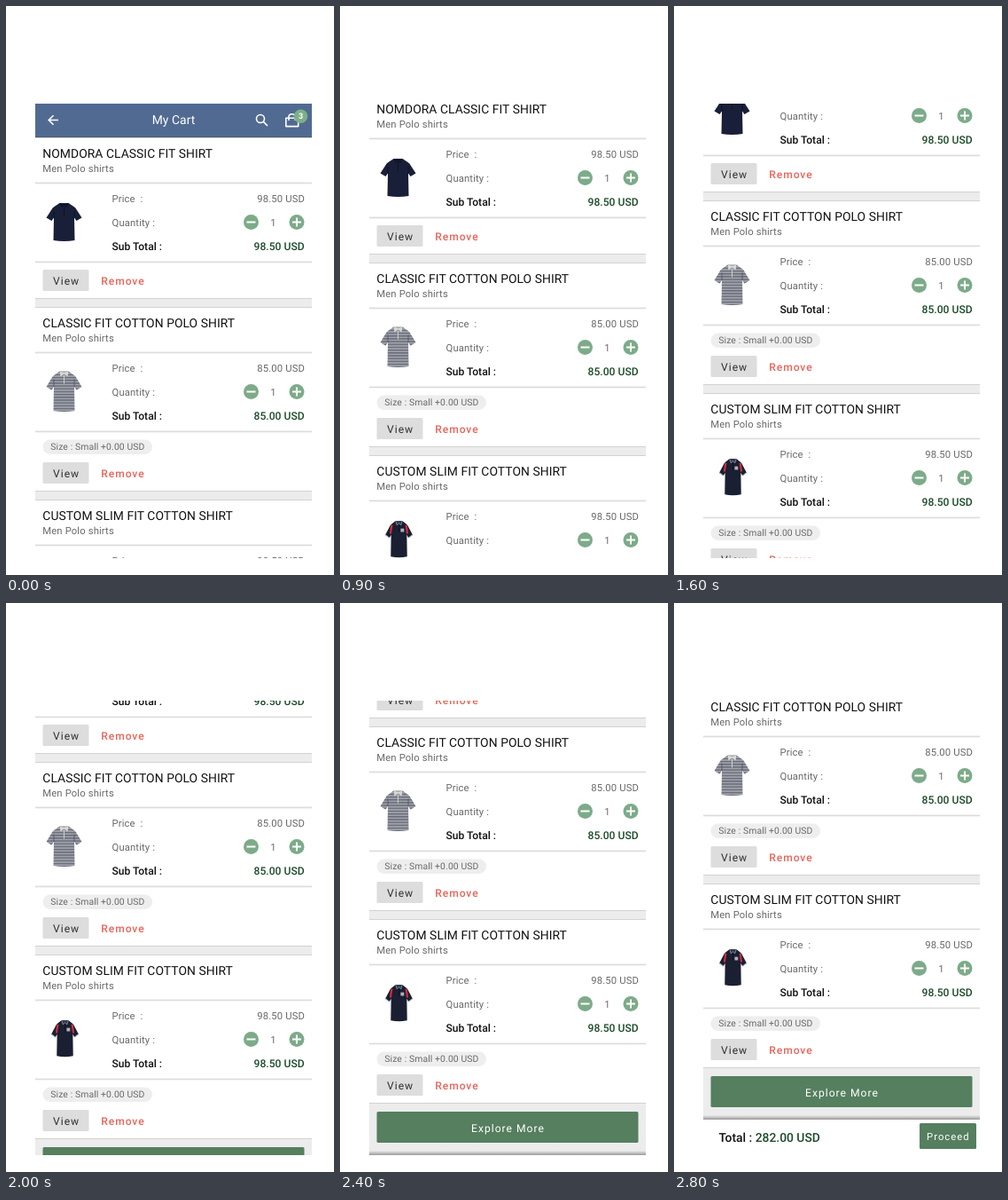
Recreate the animation shown at these times as an HTML page. Size 370 px wide and 641 px high, loop 3300 ms.

```html
<!DOCTYPE html>
<html lang="en">
<head>
<meta charset="utf-8">
<title>My Cart</title>
<style>
  html, body { margin: 0; width: 100%; height: 100%; overflow: hidden; background: #fff; }
  svg { display: block; }
  text { font: 400 11.27px Roboto, sans-serif; fill: #696969; white-space: pre; text-rendering: geometricPrecision; }
  .note { letter-spacing: .13px; }
  .title { font-size: 13.87px; letter-spacing: .06px; fill: #111; }
  .strong { font-size: 12.13px; font-weight: 500; fill: #111; }
  .green, .strong.green { fill: #1b4a28; }
  .end { text-anchor: end; }
  .mid { text-anchor: middle; }
  .chip { font-size: 10.4px; letter-spacing: .1px; }
  .btn { font-size: 12.13px; letter-spacing: 1px; fill: #303030; }
  .remove { font-weight: 500; letter-spacing: .9px; fill: #e8645a; }
  .light { fill: #fff; }
  .total { font-size: 13.87px; font-weight: 500; fill: #111; }
  .rule { fill: #dcdcdc; }
  .edge { fill: #d2d2d2; }
  .line { fill: none; stroke: #fff; stroke-width: 1.6; }

  #page { animation: scroll 3300ms steps(24, end) infinite; }
  @keyframes scroll {
    0%, 12.12% { transform: translateY(0); }
    84.848%, 100% { transform: translateY(-240px); }
  }
</style>
</head>
<body>
<svg width="370" height="641" viewBox="0 0 370 641">
  <defs>
    <clipPath id="screen"><rect x="33" y="110" width="312" height="512"/></clipPath>
    <linearGradient id="shade" x2="0" y2="1">
      <stop offset="0" stop-color="#999" stop-opacity="0"/>
      <stop offset="1" stop-color="#999"/>
    </linearGradient>
    <pattern id="stripes" width="6" height="3" patternUnits="userSpaceOnUse">
      <rect width="6" height="3" fill="#a0a2aa"/>
      <rect width="6" height="1.3" fill="#666a78"/>
    </pattern>
    <path id="shirt" d="M-5 0L-11 4Q-13 5-14.5 8L-20 16.5L-14 20L-11.5 16.5L-12 42Q0 44 12 42L11.5 16.5L14 20L20 16.5L14.5 8Q13 5 11 4L5 0Z"/>
    <g id="navy">
      <use href="#shirt" fill="#191f38"/>
      <path d="M-5 0Q0 2 5 0L3 5L0 3L-3 5Z" fill="#0f142a"/>
      <path d="M0 4V14M-11.5 16.5V9M11.5 16.5V9" stroke="#0d1225" fill="none"/>
    </g>
    <g id="striped" transform="translate(0 -1.5)">
      <use href="#shirt" fill="url(#stripes)" transform="scale(1 1.06)"/>
      <path d="M-5 0Q0 2 5 0L4 6L0 3L-4 6Z" fill="#d8d8d4"/>
      <path d="M0 4V14" stroke="#d0d0ce"/>
      <path d="M-11.5 17.5V9M11.5 17.5V9" stroke="#4d5163" stroke-width=".8"/>
    </g>
    <g id="panelled" transform="translate(1 0) scale(.77 .96)">
      <use href="#shirt" fill="#1a1f31"/>
      <path d="M-10.5 5L-12.5 15M10.5 5L12.5 15" stroke="#cf2f3c" stroke-width="2.8"/>
      <path d="M-20 16.5L-14 20M20 16.5L14 20" stroke="#b9bbc5" stroke-width="1.2"/>
      <path d="M-5 0L-3 5L0 3L3 5L5 0" fill="#343a50" stroke="#a9acb8" stroke-width=".8"/>
      <path d="M0 4V13" stroke="#0c1124"/>
      <rect x="2.5" y="9" width="5" height="4" fill="#b0b2bd"/>
    </g>
    <g id="minus">
      <circle r="8.5" fill="#7dab89"/>
      <path class="line" style="stroke-width:2" d="M-5 0H5"/>
    </g>
    <g id="plus">
      <use href="#minus"/>
      <path class="line" style="stroke-width:2" d="M0-5V5"/>
    </g>
  </defs>

  <g clip-path="url(#screen)">
    <g id="page">
      <rect x="33" y="148" width="312" height="674" fill="#ececec"/>
      <g id="cards"></g>

      <rect x="33" y="110" width="312" height="38" fill="#516a91"/>
      <rect x="33" y="147" width="312" height="1" fill="#465d81"/>
      <path class="line" d="M59 128.5H48.5M53.5 123.2L48.2 128.5L53.5 133.8"/>
      <text class="title light mid" x="189" y="133.3">My Cart</text>
      <circle class="line" cx="287" cy="127" r="4.5"/>
      <path class="line" d="M290.4 130.4L295 135"/>
      <path class="line" d="M315.8 126.2H329.7V135.6H315.8ZM319 129V125Q319 121.7 322.6 121.7T326.2 125V129" stroke-linejoin="round"/>
      <circle cx="332.5" cy="124.2" r="7.8" fill="#7db089"/>
      <text class="light mid" x="332.5" y="127.4" style="font-size:9px;font-weight:700">3</text>

      <rect x="41.5" y="773" width="295" height="35" rx="1.5" fill="#557f5f"/>
      <text class="btn light mid" x="189.5" y="795.5" font-weight="500">Explore More</text>
      <rect x="33" y="817" width="312" height="5" fill="url(#shade)"/>
      <rect x="33" y="822" width="312" height="40" fill="#fff"/>
      <text class="total" x="50.5" y="847">Total : <tspan class="green">282.00 USD</tspan></text>
      <rect x="277" y="826" width="64" height="29" rx="1.5" fill="#557f5f"/>
      <text class="btn light mid" x="309.3" y="845" style="font-size:11.27px">Proceed</text>
    </g>
  </g>
</svg>
<script>
  const items = [
    { y: 148, name: 'NOMDORA CLASSIC FIT SHIRT', price: '98.50 USD', shirt: 'navy' },
    { y: 339, name: 'CLASSIC FIT COTTON POLO SHIRT', price: '85.00 USD', shirt: 'striped', size: 'Size : Small +0.00 USD' },
    { y: 556, name: 'CUSTOM SLIM FIT COTTON SHIRT', price: '98.50 USD', shirt: 'panelled', size: 'Size : Small +0.00 USD' }
  ];

  const text = (x, y, cls, s) => `<text class="${cls}" x="${x}" y="${y}">${s}</text>`;
  const bar = (cls, y, h) => `<rect class="${cls}" x="33" y="${y}" width="312" height="${h}"/>`;

  function card({ y, name, price, shirt, size }) {
    const btn = size ? 175 : 149;
    const chip = size
      ? `<rect x="41.5" y="149.5" width="123.5" height="16.5" rx="8.25" fill="#eee"/>` + text(50.3, 161.2, 'chip', size)
      : '';
    return `<g transform="translate(0 ${y})">
      <rect x="33" width="312" height="${btn + 32}" fill="#fff"/>
      ${bar('edge', 0, 1)}${bar('rule', 50.6, 1.73)}${bar('rule', 139.6, 1.73)}${bar('edge', btn + 32, 1)}
      ${text(41.3, 23, 'title', name)}
      ${text(41.3, 39, 'note', 'Men Polo shirts')}
      <use href="#${shirt}" x="65.5" y="74"/>
      ${text(119.5, 73, 'note', 'Price  :')}
      ${text(337, 73, 'note end', price)}
      ${text(119.5, 100, 'note', 'Quantity :')}
      <use href="#minus" x="276.5" y="95.5"/>
      ${text(301.5, 100, 'note mid', '1')}
      <use href="#plus" x="328" y="95.5"/>
      ${text(119.5, 126.5, 'strong', 'Sub Total :')}
      ${text(336.7, 126.5, 'strong green end', price)}
      ${chip}
      <rect x="41.5" y="${btn}" width="52" height="24" rx="1.5" fill="#ddd"/>
      ${text(53, btn + 16.5, 'btn', 'View')}
      ${text(107.3, btn + 16.5, 'btn remove', 'Remove')}
    </g>`;
  }

  document.getElementById('cards').innerHTML = items.map(card).join('');
</script>
</body>
</html>
```
